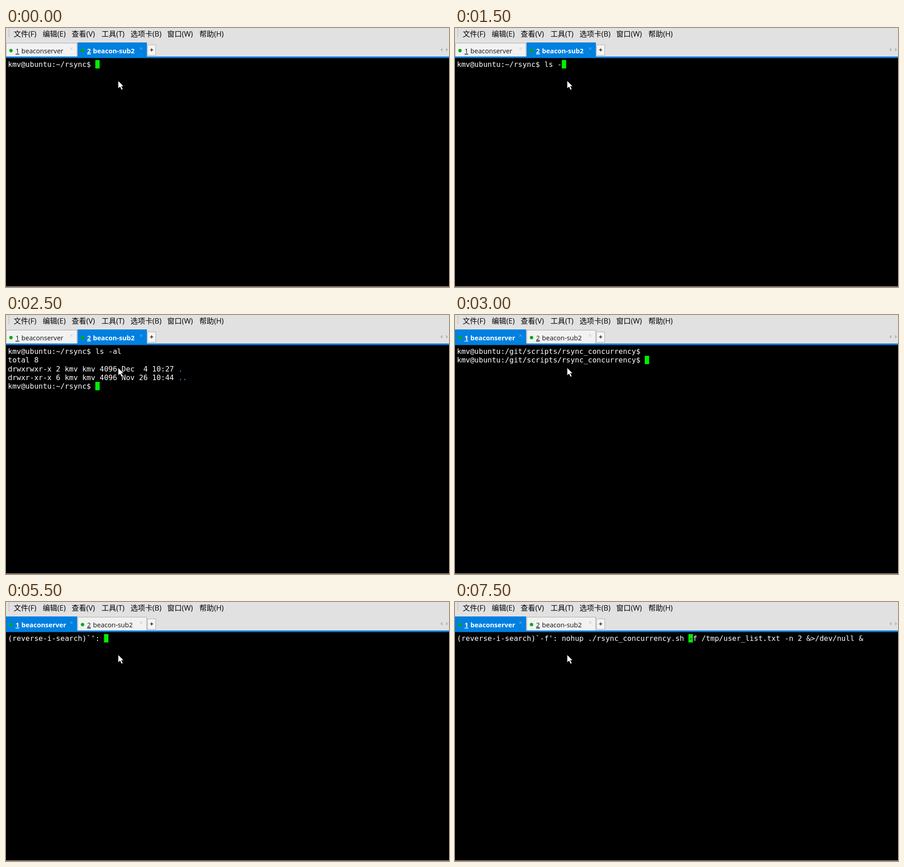
An HTML page for the animation above (8000 ms loop, 978x573 px).

```html
<!DOCTYPE html>
<html lang="zh">
<head>
<meta charset="utf-8">
<style>
html, body { margin: 0; width: 100%; height: 100%; overflow: hidden; background: #000; }
svg { display: block; width: 978px; height: 573px; }
text { white-space: pre; }
.ui { font: 16.1px "Open Sans", "Noto Sans CJK SC", "Noto Sans CJK", sans-serif; fill: #000; }
.tab text { font: 14.6px "Open Sans", sans-serif; fill: #111; }
.tab rect { fill: #f2f2f2; stroke: #a8a8a8; }
.tab path { stroke: #bcbcbc; }
.tab.active text { font-weight: 700; fill: #fff; }
.tab.active rect { fill: #0080e0; stroke: #0078d4; y: 32.5px; height: 32px; }
.tab.active path { stroke: #8cc4f0; }
#term text { font: 16px "DejaVu Sans Mono", monospace; letter-spacing: .01px; fill: #fff; }
</style>
</head>
<body>
<svg viewBox="0 0 978 573">
  <rect width="978" height="573"/>
  <rect width="978" height="64" fill="#e1e1e1"/>
  <path d="M6.5 1V20" stroke="#888" stroke-dasharray="1 1"/>
  <g id="menu" class="ui"></g>
  <g id="tabs"></g>
  <rect x="312.5" y="37.5" width="18" height="23" fill="#f5f5f5" stroke="#adadad"/>
  <path d="M318 48.5h7M321.5 45v7" stroke="#222" stroke-width="1.5"/>
  <path d="M963.5 44v8l-4.5-4zM971.5 44v8l4.5-4z" fill="#b4b4b4"/>
  <rect y="63" width="978" height="3.5" fill="#0080e0"/>
  <rect y="572" width="978" height="1" fill="#e6e6e6"/>
  <g id="term"></g>
  <path d="M247.5 116.5v17.5l4.2-3.8 3.2 6.8 3.2-1.5-3.2-6.4h5z" fill="#fff" stroke="#000" stroke-width=".9"/>
</svg>
<script>
const $ = id => document.getElementById(id);
const CELL = 9.643, ROW = 19.25, LEFT = 4.3, LOOP = 8000;

const menu = [[17, '文件(F)'], [81, '编辑(E)'], [145, '查看(V)'], [211, '工具(T)'],
  [275, '选项卡(B)'], [356, '窗口(W)'], [427, '帮助(H)']];
$('menu').innerHTML = menu.map(([x, s]) => `<text x="${x}" y="19">${s}</text>`).join('');

const tab = (x, width, number, name) => `<g class="tab">
  <rect x="${x + .5}" y="33.5" width="${width}" height="31"/>
  <circle cx="${x + 11}" cy="50" r="3.7" fill="#00aa08"/>
  <text x="${x + 21}" y="56" text-decoration="underline">${number}</text>
  <text x="${x + 34}" y="56">${name}</text>
  <path d="M${x + width - 14} 43l5 5m0-5l-5 5"/></g>`;
$('tabs').innerHTML = tab(0, 156, 1, 'beaconserver') + tab(158, 152, 2, 'beacon-sub2');

const home = 'kmv@ubuntu:~/rsync$ ';
const repo = 'kmv@ubuntu:/git/scripts/rsync_concurrency$ ';
const search = (query, found = '') => "(reverse-i-search)`" + query + "': " + found;
const listing = [home + 'ls -al', 'total 8',
  'drwxrwxr-x 2 kmv kmv 4096 Dec  4 10:27 .',
  'drwxr-xr-x 6 kmv kmv 4096 Nov 26 10:44 ..', home];

// start time, active tab, lines, cursor column (default: end of the last line)
const steps = [
  [0, 1, [home]],
  [500, 1, [home + 'l']],
  [1000, 1, [home + 'ls ']],
  [1500, 1, [home + 'ls -']],
  [2000, 1, [home + 'ls -al']],
  [2500, 1, listing],
  [3000, 0, [repo, repo]],
  [4000, 0, [repo]],
  [5500, 0, [search('')]],
  [7000, 0, [search('-', 'ls -l /tmp/rsync_*.log')], 26],
  [7500, 0, [search('-f', 'nohup ./rsync_concurrency.sh -f /tmp/user_list.txt -n 2 &>/dev/null &')], 53]
];

const escapeText = s => s.replace(/&/g, '&amp;').replace(/</g, '&lt;').replace(/>/g, '&gt;');
const put = (s, col, row, color) =>
  `<text x="${LEFT + col * CELL}" y="${86 + row * ROW}" ${color ? `style="fill:${color}"` : ''}>${escapeText(s)}</text>`;

function line(s, row) {
  const dir = s.match(/^(d.* )(\.+)$/);
  return dir ? put(dir[1], 0, row) + put(dir[2], dir[1].length, row, '#2fb4d8') : put(s, 0, row);
}

function draw([, active, lines, cursor]) {
  const row = lines.length - 1, last = lines[row], col = cursor ?? last.length;
  [...$('tabs').children].forEach((g, i) => g.classList.toggle('active', i === active));
  $('term').innerHTML = lines.map(line).join('') +
    `<rect x="${LEFT + col * CELL}" y="${71 + row * ROW}" width="${CELL}" height="18.5" fill="#00f000"/>` +
    put(last[col] || '', col, row, '#000');
}

let shown;
function tick() {
  const t = performance.now() % LOOP;
  const step = steps.findLast(s => s[0] <= t);
  if (step !== shown) draw(shown = step);
  requestAnimationFrame(tick);
}
tick();
</script>
</body>
</html>
```
